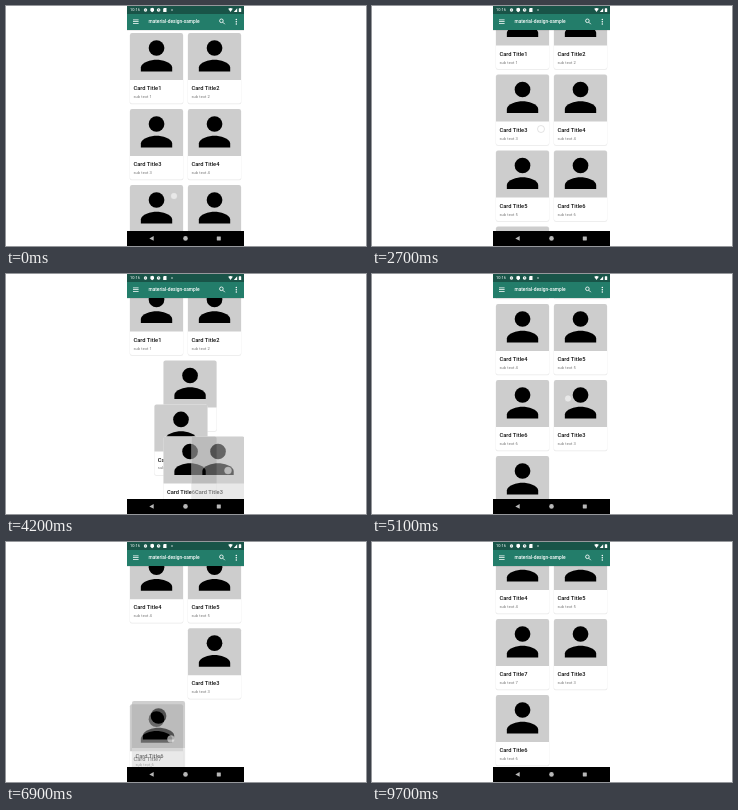
Write an HTML page that moves like this. It is 360x240 px and loops after 10000 ms.

```html
<!DOCTYPE html>
<html lang="en">
<head>
<meta charset="utf-8">
<title>Card grid</title>
<style>
  html, body { margin: 0; width: 100%; height: 100%; overflow: hidden; background: #fff; }
  svg { display: block; width: 360px; height: 240px; }
  text { font-family: Roboto, sans-serif; }
  .title { font-size: 5.7px; font-weight: 500; letter-spacing: .03px; fill: #111; }
  .sub { font-size: 4.1px; letter-spacing: .05px; fill: #777; }
</style>
</head>
<body>
<svg viewBox="0 0 360 240">
  <defs>
    <clipPath id="view"><rect x="121" y="24" width="117" height="201"/></clipPath>
  </defs>
  <rect width="360" height="240" fill="#fff"/>
  <g clip-path="url(#view)"><g id="cards"></g></g>

  <rect x="121" y="24" width="117" height="1" fill="#000" opacity=".08"/>
  <rect x="121" width="117" height="8" fill="#195448"/>
  <rect x="121" y="8" width="117" height="16" fill="#237d6a"/>
  <g fill="#fff">
    <text x="124" y="5.4" font-size="4">10:16</text>
    <circle cx="139.5" cy="4" r="1.7"/>
    <path d="M144.4 2.4L146.2 1.8L148 2.4V4.2Q147.6 5.6 146.2 6.2Q144.8 5.6 144.4 4.2Z"/>
    <circle cx="152.6" cy="4" r="1.8"/>
    <path d="M158 2h2.5v4h-3.3v-3.2z"/>
    <circle cx="166" cy="4" r=".7"/>
    <path d="M222.2 2.8Q224.5 1.2 226.8 2.8L224.5 5.9Z"/>
    <path d="M227.8 5.9L231.2 2.2V5.9Z"/>
    <path d="M232.8 2.4h.7v-.5h1v.5h.7v3.6h-2.4z"/>
    <path d="M127 13.4h5.6v.8H127zM127 15.2h5.6v.8H127zM127 17h5.6v.8H127z"/>
    <text x="142.5" y="17.4" font-size="4.8" font-weight="500">material-design-sample</text>
    <circle cx="230.3" cy="13.5" r=".75"/>
    <circle cx="230.3" cy="15.7" r=".75"/>
    <circle cx="230.3" cy="17.9" r=".75"/>
  </g>
  <g fill="none" stroke="#fff" stroke-width=".85">
    <circle cx="215.4" cy="14.8" r="1.8"/>
    <path d="M216.8 16.2L218.8 18.2"/>
    <path d="M138.7 4h1.6" stroke="#195448" stroke-width=".6"/>
    <path d="M152.6 3v1.2h.9" stroke="#195448" stroke-width=".5"/>
  </g>

  <rect x="121" y="225" width="117" height="15" fill="#000"/>
  <g fill="#b8b8b8">
    <path d="M143.3 232.4L147.7 230V234.8Z"/>
    <circle cx="179.5" cy="232.4" r="2.3"/>
    <rect x="210.8" y="230.4" width="4" height="4" rx=".4"/>
  </g>
  <circle id="touch" r="3.5" fill="#fff" fill-opacity=".55" stroke="#bbb" stroke-opacity=".6" stroke-width=".7"/>
</svg>
<script>
const LOOP = 10000, STEP = 100, SHIFT = 220;
const layer = document.getElementById('cards');
const touch = document.getElementById('touch');

// scrolls; those with a finger also hold where it lands
const scrolls = [
  { at: 0, len: 1100, by: 102, x: 168, y: 190 },
  { at: 1150, len: 1050, by: -102, x: 166, y: 90 },
  { at: 2200, len: 500, by: 34.5, x: 169, y: 157.5 },
  { at: 2700, len: 600, by: -18, x: 169, y: 123 },
  { at: 4800, len: 300, by: 56.5, x: 196, y: 181 },
  { at: 5350, len: 650, by: 15, x: 190, y: 140 },
  { at: 6700, len: 500, by: 14 }
];

// card order after each reshuffle
const orders = [
  { at: 0, ids: '1234567' }, { at: 4101, ids: '1245637' }, { at: 6960, ids: '1245736' },
  { at: 8080, ids: '1245376' }, { at: 8700, ids: '1245736' }
];

// grip: the finger's place on the card
const drags = [
  { id: 3, at: 3400, drop: 4500, grip: [36.5, 34], legs: [{ at: 3400, len: 800, by: [61.5, 76] }] },
  { id: 6, at: 6400, drop: 7500, grip: [39, 38], legs: [{ at: 6500, len: 400, by: [2, 68] }] },
  { id: 3, at: 8000, drop: 9100, grip: [32, 36], legs: [
    { at: 8000, len: 300, by: [-57, -1] }, { at: 8450, len: 550, by: [60, 1] }] }
];
const SETTLE = 250;

const clamp = v => Math.max(0, Math.min(1, v));
const mix = (a, b, u) => a.map((v, i) => v + (b[i] - v) * u);
const glide = (t, at, len) => (1 - Math.cos(Math.PI * clamp((t - at) / len))) / 2;

const scrollAt = t => scrolls.reduce((sum, s) => sum + s.by * glide(t, s.at, s.len), 0);

function slot(ids, id, scroll) {
  const n = ids.indexOf(id);
  return [124 + 58 * (n % 2), 27 + 76 * Math.floor(n / 2) - scroll];
}

// place of a card in the grid, sliding between slots after a reshuffle
function gridPos(id, t) {
  const now = orders.filter(o => o.at <= t).length - 1;
  const next = orders[now], last = orders[Math.max(0, now - 1)], scroll = scrollAt(t);
  return mix(slot(last.ids, id, scroll), slot(next.ids, id, scroll), glide(t, next.at, SHIFT));
}

function dragPos(drag, t) {
  const pos = gridPos(drag.id, drag.at);
  for (const leg of drag.legs) {
    const u = glide(t, leg.at, leg.len);
    pos[0] += leg.by[0] * u;
    pos[1] += leg.by[1] * u;
  }
  return mix(pos, gridPos(drag.id, t), glide(t, drag.drop, SETTLE));
}

function makeCard(id) {
  const g = document.createElementNS('http://www.w3.org/2000/svg', 'g');
  g.innerHTML = `
    <rect x="-.3" y=".5" width="53.6" height="70.8" rx="2" fill="#000" opacity=".09"/>
    <rect width="53" height="70.5" rx="2" fill="#fff"/>
    <path d="M0 47V2Q0 0 2 0H51Q53 0 53 2V47Z" fill="#cdcdcd"/>
    <g transform="translate(3 -.7) scale(1.96)">
      <circle cx="12" cy="8" r="4"/>
      <path d="M12 14c-2.67 0-8 1.34-8 4v2h16v-2c0-2.66-5.33-4-8-4z"/>
    </g>
    <text class="title" x="3.4" y="57.1">Card Title${id}</text>
    <text class="sub" x="3.4" y="65">sub text ${id}</text>
    <rect class="shade" width="53" height="70.5" rx="2"/>`;
  return { id, g, shade: g.querySelector('.shade') };
}

const cards = [1, 2, 3, 4, 5, 6, 7].map(makeCard);

function draw(t) {
  const drag = drags.find(d => t > d.at && t < d.drop + SETTLE);
  const swipe = scrolls.find(s => s.x && t >= s.at && t <= s.at + s.len);
  let finger = swipe && [swipe.x, swipe.y - swipe.by * glide(t, swipe.at, swipe.len)];
  let top = null;

  for (const card of cards) {
    let pos = gridPos(card.id, t), lift = 0;
    if (drag && drag.id === card.id) {
      pos = dragPos(drag, t);
      top = card.g;
      if (t <= drag.drop) {
        lift = clamp((t - drag.at) / 100);
        finger = [pos[0] + drag.grip[0], pos[1] + drag.grip[1]];
      }
    }
    card.g.setAttribute('transform', `translate(${pos})`);
    card.g.setAttribute('opacity', 1 - .4 * lift);
    card.shade.setAttribute('opacity', .14 * lift);
    layer.appendChild(card.g);
  }
  if (top) layer.appendChild(top);

  touch.setAttribute('visibility', finger ? 'visible' : 'hidden');
  if (finger) touch.setAttribute('transform', `translate(${finger})`);
}

const begin = performance.now();
function tick() {
  const t = (performance.now() - begin) % LOOP;
  draw(Math.floor(t / STEP) * STEP);
  requestAnimationFrame(tick);
}
tick();
</script>
</body>
</html>
```
